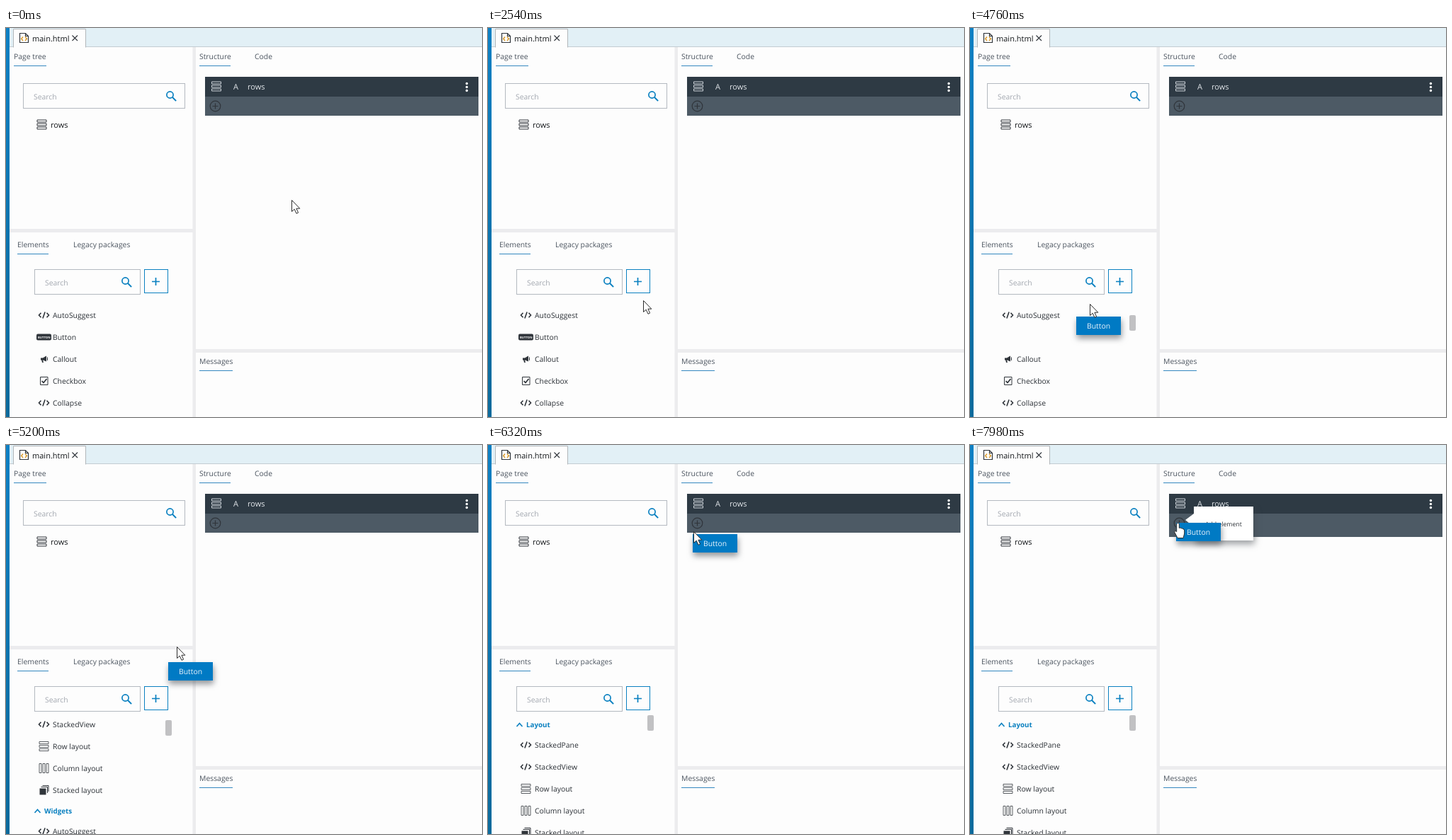
These frames come from a looping animation (672x550 px, 8000 ms). An HTML page:

```html
<!DOCTYPE html>
<html lang="en">
<head>
<meta charset="utf-8">
<title>Drag a button into the page structure</title>
<style>
html, body { margin: 0; width: 100%; height: 100%; overflow: hidden; background: #fdfdfd; }
svg { display: block; width: 672px; height: 550px; }
text { font: 10.4px "Open Sans", "Noto Sans", sans-serif; text-rendering: geometricPrecision; fill: #2b3036; white-space: pre; }
.tab { fill: #4c5560; }
.hint { fill: #a3a8b0; }
.name { font-size: 11px; fill: #15181b; }
.light { font-size: 11px; fill: #e2e6ea; }
.group { font-size: 9.8px; font-weight: 700; fill: #0a80c0; }
.split { fill: #ececee; }
.line { stroke: #3488c0; }
.box { fill: none; stroke: #b4b9c0; }
.accent { fill: none; stroke: #0a80c0; }
.ink { fill: none; stroke: #30353b; }
.solid { fill: #30353b; }
.pointer { fill: #fff; stroke: #2c2c2c; stroke-linejoin: round; }
#label rect { filter: drop-shadow(1px 5px 4px rgba(60, 66, 72, .55)); }
#tip path { filter: drop-shadow(2px 5px 5px rgba(60, 66, 72, .5)); }
</style>
</head>
<body>
<svg viewBox="0 0 672 550">
  <defs>
    <linearGradient id="edge" x2="0" y2="1">
      <stop stop-color="#0c80c4"/>
      <stop offset="1" stop-color="#0a6a9c"/>
    </linearGradient>
    <clipPath id="view"><path d="M5 386H263V550H5z"/></clipPath>
    <g id="lens"><circle r="4.6" stroke-width="1.7"/><path d="M3.3 3.3L8.6 8.6" stroke-width="2"/></g>
    <g id="bars"><path d="M-6.5 -6.5h13v3h-13zM-6.5 -1.5h13v3h-13zM-6.5 3.5h13v3h-13z"/></g>
    <g id="tags" class="ink" stroke-width="1.6"><path d="M-4 -3.2L-7 0L-4 3.2M4 -3.2L7 0L4 3.2M1.6 -4.6L-1.6 4.6"/></g>
  </defs>

  <rect width="672" height="550" fill="#fdfdfd"/>
  <rect width="5" height="550" fill="url(#edge)"/>

  <!-- file tab -->
  <rect x="5" width="667" height="27" fill="#e2f0f6"/>
  <path d="M5 26.5H672" stroke="#c3ccd2"/>
  <path d="M10.5 27.5V1.5H112.5V27.5" fill="#fdfdfd" stroke="#b2b6ba"/>
  <path class="ink" d="M19.5 7.5H27.5L31.5 11.5V20.5H19.5zM27.5 7.5V11.5H31.5" stroke-width="1.2"/>
  <path d="M24 12.5L21.7 15.2L24 18M27 12.5L29.3 15.2L27 18" fill="none" stroke="#d99a2c" stroke-width="1.5"/>
  <text class="name" x="37" y="18.5">main.html</text>
  <path class="ink" d="M93.5 10.5L101 18M101 10.5L93.5 18" stroke-width="1.1"/>

  <!-- splitters -->
  <path class="split" d="M263.5 27h4.5V550h-4.5zM5 284H264v5H5zM268 454H672v5H268z"/>

  <!-- page tree -->
  <text class="tab" x="11" y="44">Page tree</text>
  <path class="line" d="M11 53.5H57M273 53.5H317M16 319.5H60M273 484.5H320"/>
  <rect class="box" x="24.5" y="78.5" width="228" height="35"/>
  <text class="hint" x="39" y="101">Search</text>
  <use href="#lens" class="accent" x="231.5" y="94.5"/>
  <use href="#bars" class="ink" x="50.5" y="136.5"/>
  <text class="name" x="63" y="141">rows</text>

  <!-- elements -->
  <text class="tab" x="16" y="310">Elements</text>
  <text class="tab" x="95" y="310">Legacy packages</text>
  <rect class="box" x="40.5" y="341.5" width="149" height="35"/>
  <text class="hint" x="55" y="363.5">Search</text>
  <use href="#lens" class="accent" x="168.5" y="357.5"/>
  <rect class="accent" x="195.5" y="341.5" width="33" height="33"/>
  <path class="accent" d="M206 358.5H217M211.5 353V364" stroke-width="1.7"/>
  <rect id="hover" x="36" width="198" height="30" fill="#ececee"/>
  <g clip-path="url(#view)">
    <g id="list">
      <path d="M40.5 398L44.5 393.5L48.5 398" class="accent" stroke-width="1.6"/>
      <text class="group" x="54" y="399.3">Layout</text>
      <use href="#tags" x="53.5" y="424"/><text x="66" y="428">StackedPane</text>
      <use href="#tags" x="53.5" y="455"/><text x="66" y="459">StackedView</text>
      <use href="#bars" class="ink" stroke-width=".8" x="53.5" y="486"/><text x="66" y="490">Row layout</text>
      <use href="#bars" class="ink" stroke-width=".8" transform="translate(53.5 517) rotate(90)"/><text x="66" y="521">Column layout</text>
      <path class="solid" d="M47.5 545.5H56.5V554.5H47.5z"/>
      <path class="ink" d="M49.5 543.5H58.5V552M51.5 541.5H60V550"/><text x="66" y="552">Stacked layout</text>
      <path d="M40.5 580L44.5 575.5L48.5 580" class="accent" stroke-width="1.6"/>
      <text class="group" x="54" y="581.3">Widgets</text>
      <use href="#tags" x="53.5" y="606"/><text x="66" y="610">AutoSuggest</text>
      <g id="row">
        <rect class="solid" x="43" y="632.5" width="21" height="9" rx="2"/>
        <text x="45" y="638.6" style="font-size:4.2px;font-weight:700;fill:#f4f4f4">BUTTON</text>
        <text x="66" y="641">Button</text>
      </g>
      <path class="solid" d="M49 666.5H52L57 663.5V671.5L52 669.5L53 673H51L50.2 669.5H49z"/>
      <path class="ink" d="M58.5 665.5V670"/><text x="66" y="672">Callout</text>
      <path class="ink" d="M48.5 693.5H59V704.5H48.5z"/>
      <path class="ink" d="M50.5 699L53 701.5L57.5 696" stroke-width="1.7"/><text x="66" y="703">Checkbox</text>
      <use href="#tags" x="53.5" y="730"/><text x="66" y="734">Collapse</text>
    </g>
  </g>
  <rect id="thumb" x="225" width="9" height="22" rx="2" fill="#c1c1c3"/>

  <!-- structure -->
  <text class="tab" x="273" y="44">Structure</text>
  <text class="tab" x="351" y="44">Code</text>
  <rect id="drop" x="281" y="97" width="386" fill="#4d5a65"/>
  <rect x="281" y="69" width="386" height="28" fill="#2e3a44"/>
  <use href="#bars" x="297" y="82.5" fill="none" stroke="#ccd2d8"/>
  <text class="light" x="321" y="87">A</text>
  <text class="light" x="341" y="87">rows</text>
  <g fill="#fff"><circle cx="650.5" cy="78.5" r="1.7"/><circle cx="650.5" cy="83.5" r="1.7"/><circle cx="650.5" cy="88.5" r="1.7"/></g>
  <g class="ink" stroke-width="1.2"><circle cx="295.5" cy="110.5" r="7.3"/><path d="M291.5 110.5H299.5M295.5 106.5V114.5"/></g>
  <text class="tab" x="273" y="475">Messages</text>

  <g id="tip">
    <path d="M316 87H400V135H316V116L304 106L316 97z" fill="#fff"/>
    <text x="332" y="115" style="font-size:8.7px">Add element</text>
  </g>
  <g id="label">
    <rect width="63" height="26" fill="#007ac4"/>
    <text x="15" y="17" style="fill:#eaf4fb">Button</text>
  </g>
  <g id="cursor" class="pointer">
    <path id="arrow" d="M.5 .5V16.5L4.2 13.2L7 19.3L9.6 18.1L6.9 12.2H11.8z"/>
    <path id="move" d="M0 -11L4 -6.5H1.5V-1.5H6.5V-4L11 0L6.5 4V1.5H1.5V6.5H4L0 11L-4 6.5H-1.5V1.5H-6.5V4L-11 0L-6.5 -4V-1.5H-1.5V-6.5H-4z"/>
    <path id="hand" d="M-1.8 1.5Q0 -1 1.8 1.5V7.5Q3.5 6 5 8Q6.6 7 7.4 9Q9.2 8.6 9.2 11V15L7.6 21.5H-.4L-4.6 13.5Q-5 10.5 -1.8 12.5z"/>
  </g>
</svg>
<script>
const $ = id => document.getElementById(id);
const show = (id, on) => $(id).setAttribute('visibility', on ? 'visible' : 'hidden');
const place = (id, x, y) => $(id).setAttribute('transform', `translate(${x} ${y})`);

// Tracks hold [tick, x, y].
const cursorPath = [
  [31, 403, 243], [35, 370, 276], [36, 361, 289], [44, 305, 330], [53, 255, 366],
  [58, 195, 398], [64, 140, 427], [72, 120, 437], [93, 120, 437], [94, 124, 433],
  [103, 169, 390], [110, 225, 318], [118, 268, 230], [123, 284, 182],
  [128, 289, 151], [137, 290, 122], [143, 293, 110], [149, 293.5, 110]
];
const labelPath = [
  [94, 122, 436], [103, 150, 408], [110, 212, 337], [118, 256, 256], [123, 276, 208],
  [128, 284, 172], [137, 289, 126], [146, 291, 118], [149, 291, 110]
];
const HOVER = 58, DRAG = 94, OVER = 141, TIP = 144;

function along(path, n) {
  const i = path.findIndex(p => p[0] > n);
  if (i < 0) return path[path.length - 1].slice(1);
  if (i === 0) return path[0].slice(1);
  const a = path[i - 1], b = path[i], k = (n - a[0]) / (b[0] - a[0]);
  return [1, 2].map(j => Math.round(a[j] + (b[j] - a[j]) * k));
}

// Motion advances three ticks every 140 ms, held for 20, 20 and 100 ms.
function tickAt(ms) {
  const u = ms + 20, r = u % 140;
  return 3 * Math.floor(u / 140) + (r < 20 ? 0 : r < 40 ? 1 : 2);
}

function draw(n) {
  const [x, y] = along(cursorPath, n);
  const drag = n >= DRAG, hovering = n >= HOVER && !drag;
  const scroll = Math.min(1, Math.max(0, (n - 106) / 10));

  place('cursor', x, y);
  show('arrow', !hovering && n < OVER);
  show('move', hovering);
  show('hand', n >= OVER);

  show('hover', hovering);
  $('hover').setAttribute('y', y < 422 ? 391 : 422);
  show('thumb', n >= HOVER);
  $('thumb').setAttribute('y', 406 - Math.round(24 * scroll));
  place('list', 0, Math.round(200 * (scroll - 1)));
  show('row', !drag);

  show('label', drag);
  place('label', ...along(labelPath, n));
  show('tip', n >= TIP);
  $('drop').setAttribute('height', n >= OVER ? 33 : 27);
}

const start = performance.now();
function frame() {
  draw(tickAt((performance.now() - start) % 8000));
  requestAnimationFrame(frame);
}
frame();
</script>
</body>
</html>
```
